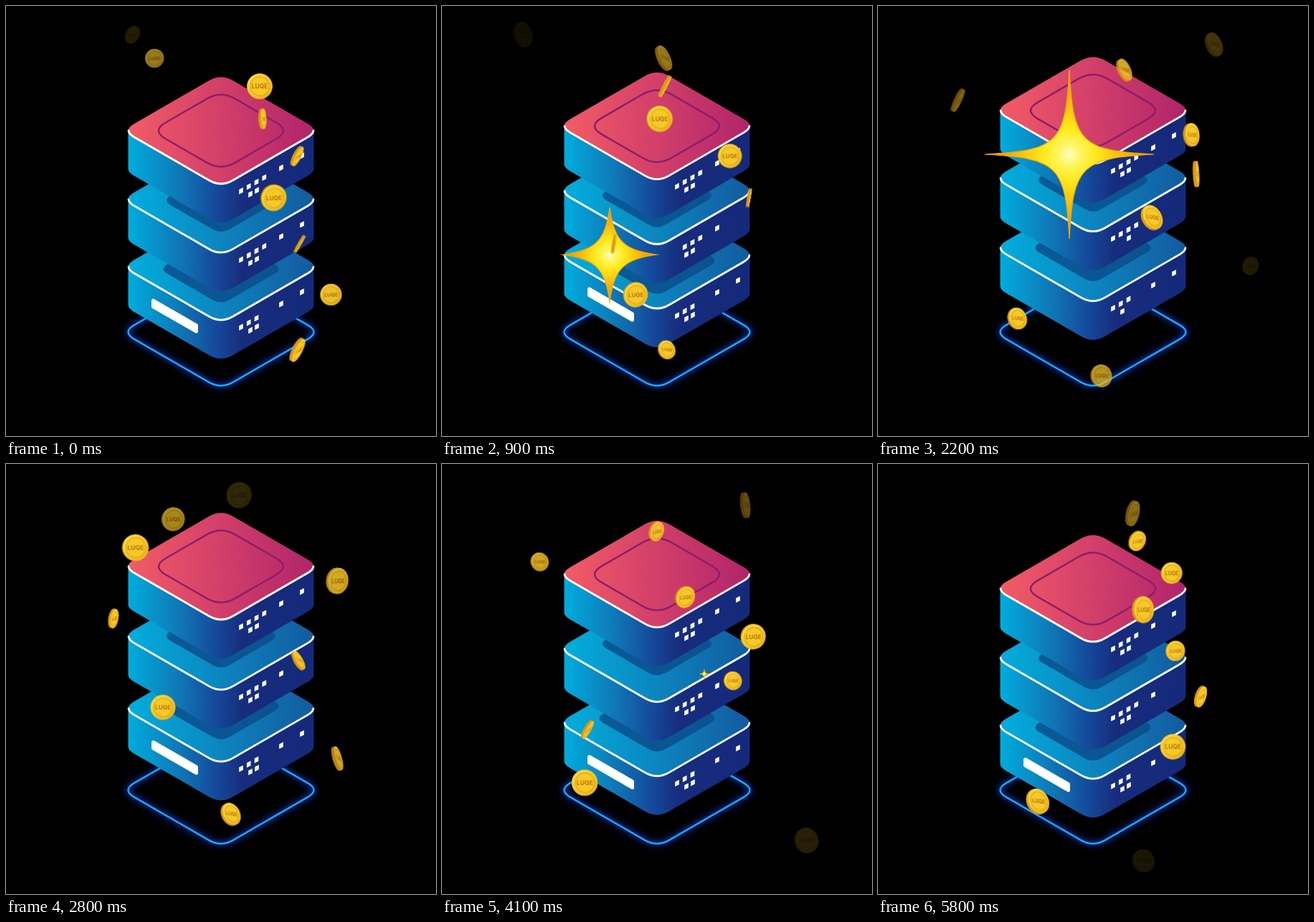
Write an HTML page with a canvas that moves like this. It is 600 px wide and 600 px high and loops after 5.9 s.

```html
<!DOCTYPE html>
<html lang="en">
<head>
<meta charset="utf-8">
<title>Server stack with falling coins</title>
<style>
  html, body { margin: 0; width: 100%; height: 100%; overflow: hidden; background: #000; }
  svg, canvas { position: absolute; left: 0; top: 0; width: 600px; height: 600px; }
</style>
</head>
<body>
<svg id="scene" viewBox="0 0 600 600">
  <defs>
    <linearGradient id="side" gradientUnits="userSpaceOnUse" x1="170" x2="430" y1="0" y2="0">
      <stop offset="0" stop-color="#00addd"/>
      <stop offset=".25" stop-color="#0e7dba"/>
      <stop offset=".48" stop-color="#15489a"/>
      <stop offset=".62" stop-color="#172c7c"/>
      <stop offset="1" stop-color="#15297a"/>
    </linearGradient>
    <linearGradient id="blue" gradientUnits="userSpaceOnUse" x1="170" x2="430" y1="0" y2="0">
      <stop offset="0" stop-color="#03aedd"/>
      <stop offset=".5" stop-color="#0c85bf"/>
      <stop offset="1" stop-color="#135a9e"/>
    </linearGradient>
    <linearGradient id="pink" gradientUnits="userSpaceOnUse" x1="170" x2="430" y1="0" y2="0">
      <stop offset="0" stop-color="#f25c66"/>
      <stop offset=".5" stop-color="#d23f69"/>
      <stop offset="1" stop-color="#b0246b"/>
    </linearGradient>
    <filter id="blur" x="-20%" y="-30%" width="140%" height="160%"><feGaussianBlur stdDeviation="5"/></filter>
  </defs>
</svg>
<canvas id="sky" width="600" height="600"></canvas>
<script>
const LOOP = 5.9, STEP = 0.1, SLOPE = 0.577, LABEL = 'LUQE';
const svg = document.getElementById('scene');
const sky = document.getElementById('sky').getContext('2d');
const clamp = v => Math.min(1, Math.max(0, v));

function add(parent, tag, attrs) {
  const el = document.createElementNS('http://www.w3.org/2000/svg', tag);
  for (const key in attrs) el.setAttribute(key, attrs[key]);
  return parent.appendChild(el);
}

// Isometric diamond around (300, cy) with its corners cut and rounded.
function diamond(w, cut, cy = 0) {
  const h = w * SLOPE, c = cut * SLOPE, l = 300 - w, r = 300 + w;
  return `M${300 - cut},${cy - h + c}Q300,${cy - h} ${300 + cut},${cy - h + c}` +
    `L${r - cut},${cy - c}Q${r},${cy} ${r - cut},${cy + c}` +
    `L${300 + cut},${cy + h - c}Q300,${cy + h} ${300 - cut},${cy + h - c}` +
    `L${l + cut},${cy + c}Q${l},${cy} ${l + cut},${cy - c}Z`;
}

// Floor outline with a soft glow
const outline = { d: diamond(138, 17, 455), fill: 'none' };
add(svg, 'path', { ...outline, stroke: '#0a48ff', 'stroke-width': 7, opacity: .55, filter: 'url(#blur)' });
add(svg, 'path', { ...outline, stroke: '#0a6cf0', 'stroke-width': 3.4, opacity: .5 });
add(svg, 'path', { ...outline, stroke: '#16b8ff', 'stroke-width': 1.9 });

// Lights sit on two rows that run parallel to the right edge.
const light = (x, row) => [x, 84 - SLOPE * (x - 328) + 12 * row];
const LIGHTS = [
  ...[328, 338.7, 349.5, 360.3, 384, 413].map(x => light(x, 0)),
  ...[341, 350].map(x => light(x, 1))
];

function makeBox(base, lead, shadow, top) {
  const g = add(svg, 'g', {});
  if (shadow) add(g, 'path', { d: diamond(shadow + 6, 12, 97), fill: '#0a4c8a', opacity: .82 });
  add(g, 'path', {
    d: 'M170.5,0V53Q170.5,58 179,63L283,123Q300,133 317,123L421,63Q429.5,58 429.5,53V0Z',
    fill: 'url(#side)'
  });
  add(g, 'path', { d: diamond(138, 17), fill: `url(#${top})` });
  add(g, 'path', {
    d: 'M171,0Q171.5,4.5 179,9L283,69Q300,79 317,69L421,9Q428.5,4.5 429,0',
    fill: 'none', stroke: '#fff', 'stroke-width': 2.8, 'stroke-linecap': 'round'
  });
  const lights = LIGHTS.map(([x, y]) =>
    add(g, 'path', { d: `M${x - 2.8},${y - 1.9}l5.6,-2.8v6.6l-5.6,2.8z`, fill: '#fff' }));
  return { g, base, lead, lights };
}

// From the bottom up, each box a little behind the one below
const low = makeBox(368.5, .75, 0, 'blue');
const mid = makeBox(271, .37, 80.5, 'blue');
const high = makeBox(174, 0, 76, 'pink');
const boxes = [low, mid, high];
add(high.g, 'path', { d: diamond(97, 20), fill: 'none', stroke: '#8f1d68', 'stroke-width': 2.5 });
const bar = add(low.g, 'path', {
  d: 'M205.5,47L265.5,81.6V90L205.5,55.5Z',
  fill: '#fff', stroke: '#fff', 'stroke-width': 5, 'stroke-linejoin': 'round'
});
low.lights[3].remove();

const within = (t, from, length = .5) => t >= from && t < from + length;
const show = (el, on) => el.setAttribute('visibility', on ? 'visible' : 'hidden');

function blink(t) {
  const pause = within(t, 2);
  show(bar, !pause);
  show(low.lights[7], !pause);
  show(mid.lights[6], !pause);
  show(mid.lights[0], !within(t, .7) && !within(t, 4.7));
  show(mid.lights[5], t < .4);
}

const easeInOut = p => p < .5 ? 2 * p * p : 1 - 2 * (1 - p) ** 2;

function lift(t) {
  const u = t % LOOP, peak = 2.8;
  return 31 * easeInOut(u < peak ? u / peak : (LOOP - u) / (LOOP - peak));
}

// Sparkles: x, y, reach, start
const stars = [
  [234, 347, 66, .5], [267, 207, 118, 1.8], [274, 420, 136, 2.9],
  [389, 107, 68, 3.25], [366, 293, 67, 4.02], [234, 347, 66, 4.85]
];

function drawStar(x, y, R) {
  // The body grows less than the rays do.
  const waist = Math.min(.27 * R, 15 + .065 * R);
  const sum = (8 * waist - R) / 3, a = sum * .25, b = sum * .75;
  sky.save();
  sky.translate(x, y);
  sky.beginPath();
  sky.moveTo(0, -R);
  for (let i = 0; i < 4; i++) {
    sky.bezierCurveTo(a, -b, b, -a, R, 0);
    sky.rotate(Math.PI / 2);
  }
  const fill = sky.createRadialGradient(0, 0, 0, 0, 0, R);
  [[0, '#ffffc0'], [.12, '#fff668'], [.3, '#ffea1c'], [.6, '#f8bb0e'], [1, '#e08c00']]
    .forEach(s => fill.addColorStop(...s));
  sky.fillStyle = fill;
  sky.fill();
  sky.strokeStyle = '#f2ac06';
  sky.lineWidth = Math.min(1.2, R / 8);
  sky.stroke();
  sky.restore();
}

// Coin rain: an endless stream of seeded coins, accelerating as they fall
const TOP = 40, SPEED = 330, PULL = 390, LIFE = .82, GAP = .09, SPIN = 11;
const MAX_LEAN = 30 * Math.PI / 180;

function rnd(i, k) {
  const v = Math.sin(i * 12.9898 + k * 78.233) * 43758.5453;
  return v - Math.floor(v);
}

// Coins dim towards the edges of the stage.
const edgeAlpha = (x, y) =>
  clamp((x - 70) / 80) * clamp((530 - x) / 80) * clamp((y - 30) / 70) * clamp((560 - y) / 60);

// Each coin is painted whole on a stamp first, so that fading does not show its layers.
const SIZE = 64;
const stamp = document.createElement('canvas');
stamp.width = stamp.height = SIZE;
const pen = stamp.getContext('2d');

function disc(x, rx, r, fill) {
  pen.beginPath();
  pen.ellipse(x, 0, rx, r, 0, 0, 2 * Math.PI);
  pen.fillStyle = fill;
  pen.fill();
}

function paintCoin(r, turn, lean) {
  const squash = Math.max(.05, Math.abs(Math.cos(turn)));
  const depth = .13 * r * Math.abs(Math.sin(turn));
  pen.clearRect(0, 0, SIZE, SIZE);
  pen.save();
  pen.translate(SIZE / 2, SIZE / 2);
  pen.rotate(lean);
  for (let o = -depth; o < depth; o += .5) disc(o, r * squash, r, '#dc9a14');
  pen.translate(depth, 0);
  pen.scale(squash, 1);
  pen.rotate(-lean);
  const shine = pen.createLinearGradient(-r, -r, r, r);
  shine.addColorStop(0, '#ffdf3c');
  shine.addColorStop(1, '#e8ae1a');
  disc(0, r, r, shine);
  disc(0, r * .77, r * .77, '#dfa31a');
  disc(0, r * .71, r * .71, '#f6c92a');
  pen.fillStyle = '#b8760f';
  pen.font = `700 ${r * .48}px Inter, Arial, sans-serif`;
  pen.textAlign = 'center';
  pen.textBaseline = 'middle';
  pen.fillText(LABEL, 0, r * .03);
  pen.restore();
}

function drawRain(t, weight) {
  if (weight <= 0) return;
  for (let i = Math.ceil((t - LIFE) / GAP); i * GAP <= t; i++) {
    const age = t - i * GAP;
    const x = 105 + 390 * rnd(i, 1) + 120 * (rnd(i, 2) - .5) * age;
    const y = TOP + SPEED * age + PULL * age * age;
    const turn = Math.PI * rnd(i, 3) + SPIN * age;
    const lean = MAX_LEAN * Math.sin(2 * Math.PI * rnd(i, 4) + SPIN * age);
    paintCoin(12.5 + 6 * rnd(i, 5), turn, lean);
    sky.globalAlpha = weight * edgeAlpha(x, y);
    sky.drawImage(stamp, x - SIZE / 2, y - SIZE / 2);
  }
  sky.globalAlpha = 1;
}

function draw(t) {
  for (const b of boxes) b.g.setAttribute('transform', `translate(0 ${b.base - lift(t + b.lead)})`);
  blink(t);

  sky.clearRect(0, 0, 600, 600);
  for (const [x, y, reach, start] of stars) {
    const k = (t - start) / .8;
    if (k > 0 && k < 1) drawStar(x, y, reach * Math.sin(Math.PI * k) ** 2);
  }
  // The rain crossfades into its own beginning to close the loop.
  const fade = clamp((t - 4.1) / 1.7);
  drawRain(t, 1 - fade);
  drawRain(t - LOOP, fade);
}

function tick() {
  const steps = Math.floor(performance.now() / 1000 / STEP) % Math.round(LOOP / STEP);
  draw(steps * STEP + 1e-6);
  requestAnimationFrame(tick);
}
tick();
</script>
</body>
</html>
```
